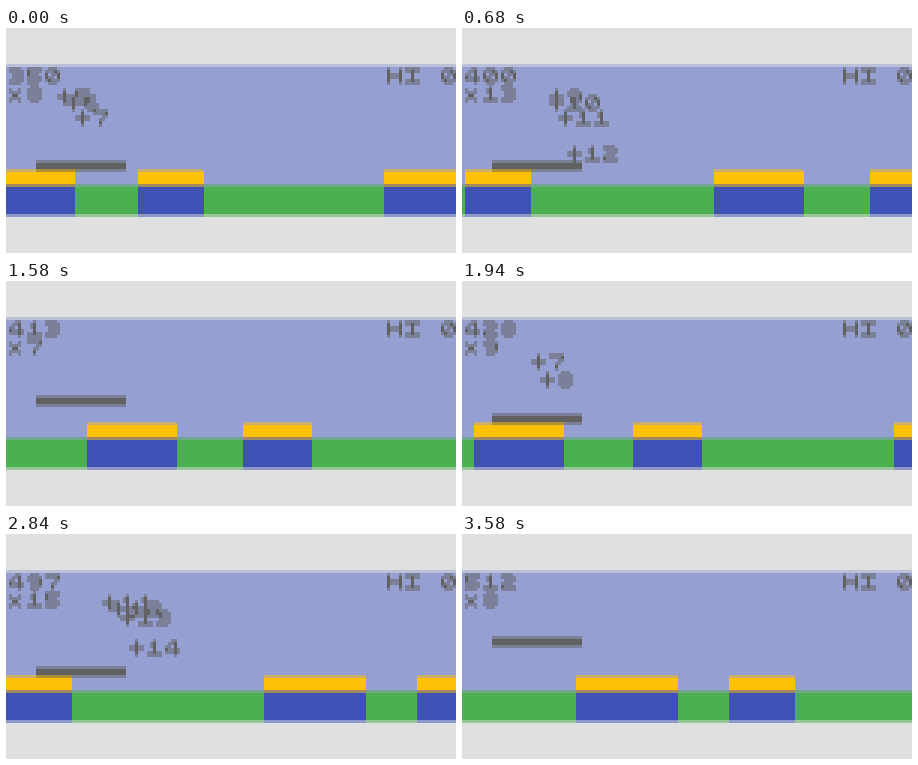
Animation of 450 by 225 pixels, one loop 3600 ms. Source, as an HTML page with a canvas:

```html
<!DOCTYPE html>
<html lang="en">
<head>
<meta charset="utf-8">
<title>Bar jump</title>
<style>
  html, body { margin: 0; width: 100%; height: 100%; overflow: hidden; background: #e0e0e0; }
  canvas { display: block; width: 450px; height: 225px; image-rendering: pixelated; }
</style>
</head>
<body>
<canvas id="stage" width="150" height="75"></canvas>
<script>
const TICK = 20, TICKS = 180;
const view = document.getElementById('stage').getContext('2d');
const buffer = document.createElement('canvas');
buffer.width = 150;
buffer.height = 75;
const ctx = buffer.getContext('2d');

// Letter strokes on a 5 x 5 grid, each written as x1 y1 x2 y2
const STROKES = {
  0: '1030 0103 4143 1434 3113',
  1: '2024 1111 0444',
  2: '0030 4141 1232 0303 0444',
  3: '0030 4141 1232 4343 0434',
  4: '2030 3134 1111 0202 0343',
  5: '0040 0101 0232 4343 0434',
  6: '1030 0103 0232 4343 1434',
  7: '0040 4141 3232 2324',
  8: '1030 0101 4141 1232 0303 4343 1434',
  9: '1030 0101 4142 1232 4343 1434',
  '+': '2024 0242',
  x: '0134 3104',
  H: '0004 4044 0242',
  I: '0040 2024 0444'
};

// Platforms: starting x, width
const PLATFORMS = [[-6.7, 30], [44.3, 22], [126.75, 30], [179.3, 23], [266.5, 34], [317.5, 22]];

// One gain per step spent on platforms; the value is the multiplier at that time
const gains = [];
for (let value = 5; value <= 13; value++) gains.push({ value, at: Math.ceil(-8 + 8.4 * (value - 7)) });
for (let value = 7; value <= 15; value++) gains.push({ value, at: 84 + 8 * (value - 7) });

const JUMP_1 = 56, LANDING = 84, JUMP_2 = 155;

function rect(color, x, y, w, h) {
  ctx.fillStyle = color;
  ctx.fillRect(Math.floor(x), Math.floor(y), w, h);
}

function print(text, x, y) {
  [...text].forEach((char, i) => {
    for (const stroke of (STROKES[char] || '').split(' ').filter(Boolean)) {
      const [x1, y1, x2, y2] = [...stroke].map(Number);
      const length = Math.max(Math.abs(x2 - x1), Math.abs(y2 - y1));
      for (let k = 0; k <= length; k++) {
        rect('#616161',
          x + 6 * i + 1 + x1 + Math.sign(x2 - x1) * k,
          y + 1 + y1 + Math.sign(y2 - y1) * k, 1, 1);
      }
    }
  });
}

const flight = (y, t) => y - 1.85 * t + 0.06 * t * t;

function barY(n) {
  if (n >= JUMP_2) return flight(32, n - JUMP_2);
  if (n >= LANDING || n < 45) return 32;
  if (n >= JUMP_1) return flight(37, n - JUMP_1);
  return Math.min(37, 32 + 0.06 * (n - 45) ** 2);
}

function multiplier(n) {
  if (n >= JUMP_2) return 8;
  if (n >= JUMP_1 && n < LANDING) return 7;
  return gains.filter(g => g.at <= n).pop().value + 1;
}

function drawGame(n) {
  rect('#969fd1', 0, 0, 150, 40);
  rect('#4caf50', 0, 40, 150, 10);
  const scroll = 1.247 * n + n * n / 7200;
  for (const [x, width] of PLATFORMS) {
    rect('#ffc107', x - scroll, 35, width, 5);
    rect('#3f51b5', x - scroll, 40, width, 10);
  }
  rect('#616161', 10, barY(n), 30, 3);

  let score = 350;
  for (const { value, at } of gains) {
    const age = n - at;
    if (age < 0) continue;
    if (at > 0) score += value;
    if (age < 30) {
      const label = '+' + value;
      print(label, 3 * value + 7 - 3 * label.length, 26 - 20 * (1 - 0.9 ** age));
    }
  }
  print(String(score), 0, 0);
  print('x' + multiplier(n), 0, 6);
  print('HI 0', 126, 0);
}

function frame() {
  const n = Math.floor(performance.now() / TICK) % TICKS;
  rect('#e0e0e0', 0, 0, 150, 75);
  ctx.save();
  ctx.translate(0, 12);
  drawGame(n);
  ctx.restore();

  // The game sits half a pixel lower, so neighbouring rows are averaged
  view.globalAlpha = 1;
  view.drawImage(buffer, 0, 0);
  view.globalAlpha = 0.5;
  view.drawImage(buffer, 0, 1);
  requestAnimationFrame(frame);
}
frame();
</script>
</body>
</html>
```
